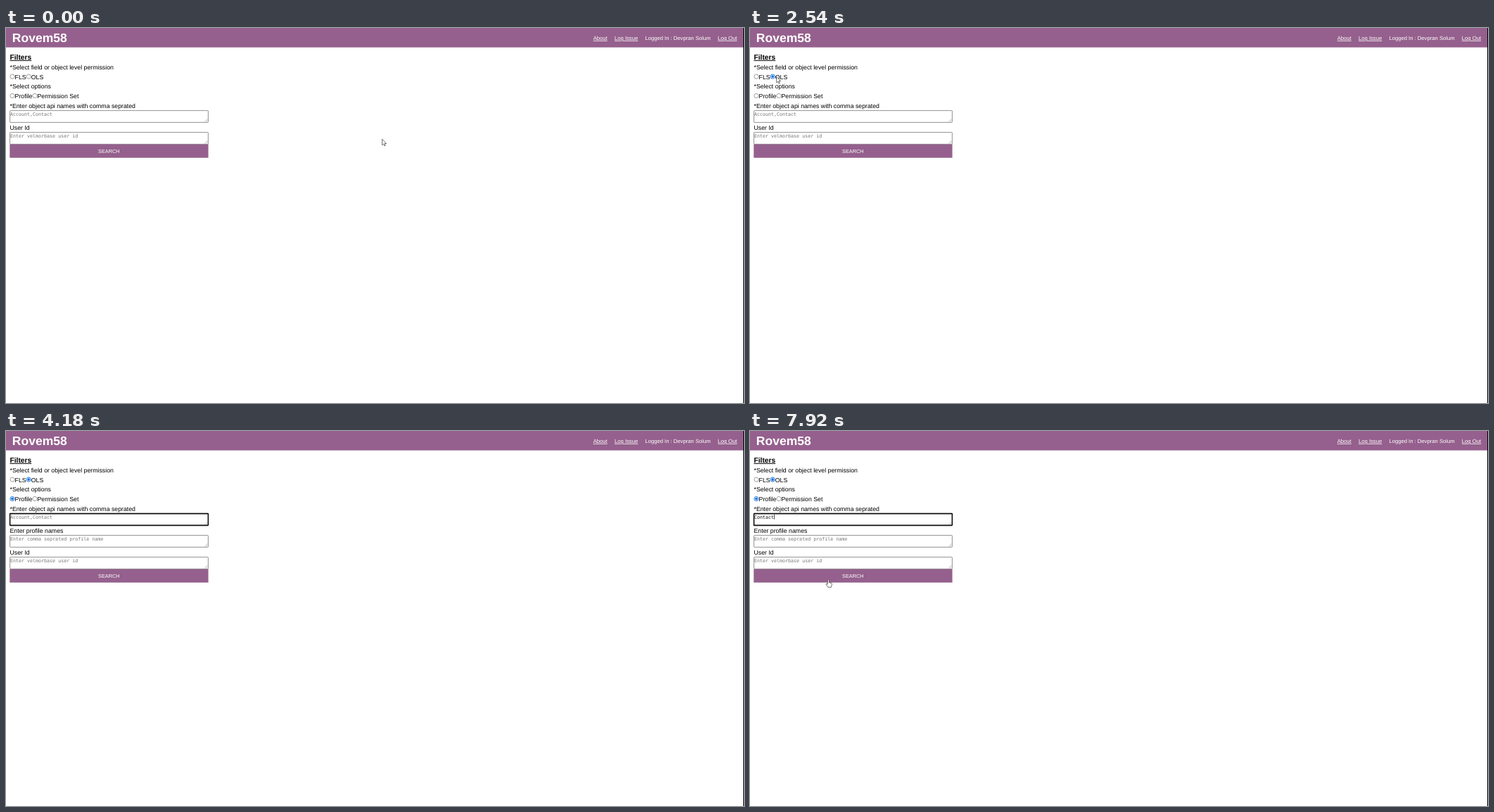
Recreate the animation shown at these times as an HTML page. Size 1049 by 534 pixels, loop 8000 ms.

```html
<!DOCTYPE html>
<html lang="en">
<head>
<meta charset="utf-8">
<title>Permission filters</title>
<style>
  html, body { margin: 0; width: 100%; height: 100%; overflow: hidden; background: #fff; }
  svg { display: block; width: 1049px; height: 534px; }
  text { font-family: "Liberation Sans", Arial, sans-serif; font-size: 8.76px; text-rendering: geometricPrecision; white-space: pre; }
  .title { font-size: 17.52px; font-weight: 700; fill: #fff; }
  .nav { font-size: 7.665px; fill: #fff; }
  .head { font-size: 10.25px; font-weight: 700; }
  .mono { font-family: "DejaVu Sans Mono", monospace; font-size: 6.66px; fill: #757575; }
  .button { font-size: 7.3px; fill: #fff; text-anchor: middle; }
  .link { text-decoration: underline; }
  .bar { fill: #95608d; }
  .box { fill: #fff; stroke: #767676; stroke-width: .8; }
  .box.focus { stroke: #101010; stroke-width: 1.6; }
  .grip { fill: none; stroke: #8a8a8a; stroke-width: .55; }
  .ring { fill: #fff; stroke: #767676; stroke-width: .7; }
  .dot { fill: #0b6fdc; visibility: hidden; }
  .hover .ring { stroke: #404040; stroke-width: .85; }
  .on .ring { stroke: #0b6fdc; stroke-width: .9; }
  .on .dot { visibility: visible; }
  .pointer path { fill: #fff; stroke: #333; stroke-width: .7; stroke-linejoin: round; }
  .pointer .beam { fill: none; }
</style>
</head>
<body>
<svg id="stage" viewBox="0 0 1049 534"></svg>
<script>
const LOOP = 8000;
const SHIFT = 31;   // height of the extra profile row

const text = (x, y, s, cls = '') => `<text x="${x}" y="${y}" class="${cls}">${s}</text>`;

const radio = (id, x, y) => `<g id="${id}">
  <circle class="ring" cx="${x}" cy="${y}" r="3.1"/><circle class="dot" cx="${x}" cy="${y}" r="1.8"/></g>`;

const field = (y, hint, id) => `<rect id="${id}Box" class="box" x="5.6" y="${y}" width="281.8" height="16.8" rx=".6"/>
  <path class="grip" d="M282.4 ${y + 15.8}l4-4M284.6 ${y + 15.8}l1.8-1.8"/>
  <text id="${id}" class="mono" x="6" y="${y + 7.2}">${hint}</text>`;

const stage = document.getElementById('stage');
stage.innerHTML = `
  <rect class="bar" width="1049" height="27.6"/>
  <rect x="1048" width="1" height="534"/>
  ${text(8.8, 19.7, 'Rovem58', 'title')}
  ${text(834.7, 16.9, 'About', 'nav link')}
  ${text(865, 16.9, 'Log Issue', 'nav link')}
  ${text(908.4, 16.9, 'Logged In : Devpran Solum', 'nav')}
  ${text(1011.8, 16.9, 'Log Out', 'nav link')}
  ${text(5.5, 44.8, 'Filters', 'head link')}
  ${text(5.5, 59, '*Select field or object level permission')}
  ${radio('fls', 9, 69.1)}${text(12.6, 72.6, 'FLS')}
  ${radio('ols', 32.2, 69.1)}${text(35.8, 72.6, 'OLS')}
  ${text(5.5, 86.2, '*Select options')}
  ${radio('profile', 9, 96.5)}${text(12.6, 100, 'Profile')}
  ${radio('set', 41, 96.5)}${text(44.5, 100, 'Permission Set')}
  ${text(5.5, 113.6, '*Enter object api names with comma seprated')}
  ${field(117.6, '', 'objects')}
  <rect id="caret" y="118.8" width=".7" height="7"/>
  <g id="profileRow">
    ${text(5.5, 144.6, 'Enter profile names')}
    ${field(148.6, 'Enter comma seprated profile name', 'names')}
  </g>
  <g id="lower">
    ${text(5.5, 144.6, 'User Id')}
    ${field(148.6, 'Enter velmorbase user id', 'user')}
    <rect class="bar" x="5.3" y="165.6" width="282.3" height="19.2"/>
    ${text(146.3, 177.8, 'SEARCH', 'button')}
  </g>
  <g id="pointer" class="pointer">
    <path class="arrow" d="M0 0V8.6L2 6.8L3.4 9.8L4.7 9.2L3.4 6.3H6Z"/>
    <path class="beam" d="M-1.3 -4H1.3M0 -4V4M-1.3 4H1.3"/>
    <path class="hand" d="M-1 .6Q0 -.8 1 .6V4L4.4 4.8Q5.2 5.2 5 6.4L4 10.6H-.6L-3.3 6.6Q-3.4 5.2 -2.2 5.6L-1 6.6Z"/>
  </g>`;

const $ = id => document.getElementById(id);
const shapes = [...$('pointer').children];

// time, x, y, shape
const moves = [
  [0, 534.7, 158.2, 'arrow'], [120, 322, 1, 'arrow'], [720, 156.5, 73.5, 'arrow'],
  [900, 80, 73, 'arrow'], [1000, 34, 72, 'arrow'], [1110, 20.2, 71, 'arrow'],
  [1400, 17, 70.5, 'arrow'], [1490, 15, 70.5, 'arrow'],
  [1900, 18, 70, 'arrow'], [2000, 23, 70, 'arrow'], [2090, 28, 69.5, 'arrow'],
  [2180, 32, 69.5, 'arrow'], [2460, 35, 69.5, 'arrow'], [2540, 37.7, 69.3, 'arrow'],
  [2740, 37, 72, 'arrow'], [2840, 34, 79, 'arrow'], [2930, 30, 86, 'arrow'],
  [3020, 26, 92, 'arrow'], [3120, 22, 96, 'arrow'], [3220, 20.2, 96.8, 'arrow'],
  [3700, 30, 125, 'beam'], [4180, 0, 0, ''],
  [7240, 170, 43, 'arrow'], [7340, 165, 72, 'arrow'], [7430, 157, 103, 'arrow'],
  [7530, 147, 128, 'beam'], [7630, 136, 157, 'beam'], [7720, 125, 184, 'beam'],
  [7820, 115, 206, 'hand'], [7920, 111.4, 211.8, 'hand']
];
const keys = [5190, 5580, 5670, 5990, 6180, 6270, 6560];
const word = 'Contact';

const between = (t, a, b = LOOP) => t >= a && t < b;
const show = (el, on) => { el.style.display = on ? '' : 'none'; };

function draw(t) {
  const [, x, y, kind] = moves.findLast(m => m[0] <= t);
  $('pointer').setAttribute('transform', `translate(${x} ${y})`);
  shapes.forEach(s => show(s, s.classList.contains(kind)));

  $('fls').classList.toggle('hover', between(t, 1110, 2000));
  $('ols').classList.toggle('hover', between(t, 2090, 2370));
  $('ols').classList.toggle('on', t >= 2370);
  $('profile').classList.toggle('on', t >= 3500);

  const open = t >= 3500;
  show($('profileRow'), open);
  $('lower').setAttribute('transform', `translate(0 ${open ? SHIFT : 0})`);

  const typed = keys.filter(k => k <= t).length;
  $('objects').textContent = typed ? word.slice(0, typed) : 'Account,Contact';
  $('objects').style.fill = typed ? '#111' : '';
  $('objectsBox').classList.toggle('focus', t >= 3790);
  $('caret').setAttribute('x', 6 + typed * 4.01);
  show($('caret'), between(t, 3790, 4180) || between(t, 5190, 7060) || t >= 7530);
}

const start = performance.now();
function tick() {
  draw((performance.now() - start) % LOOP);
  requestAnimationFrame(tick);
}
tick();
</script>
</body>
</html>
```
